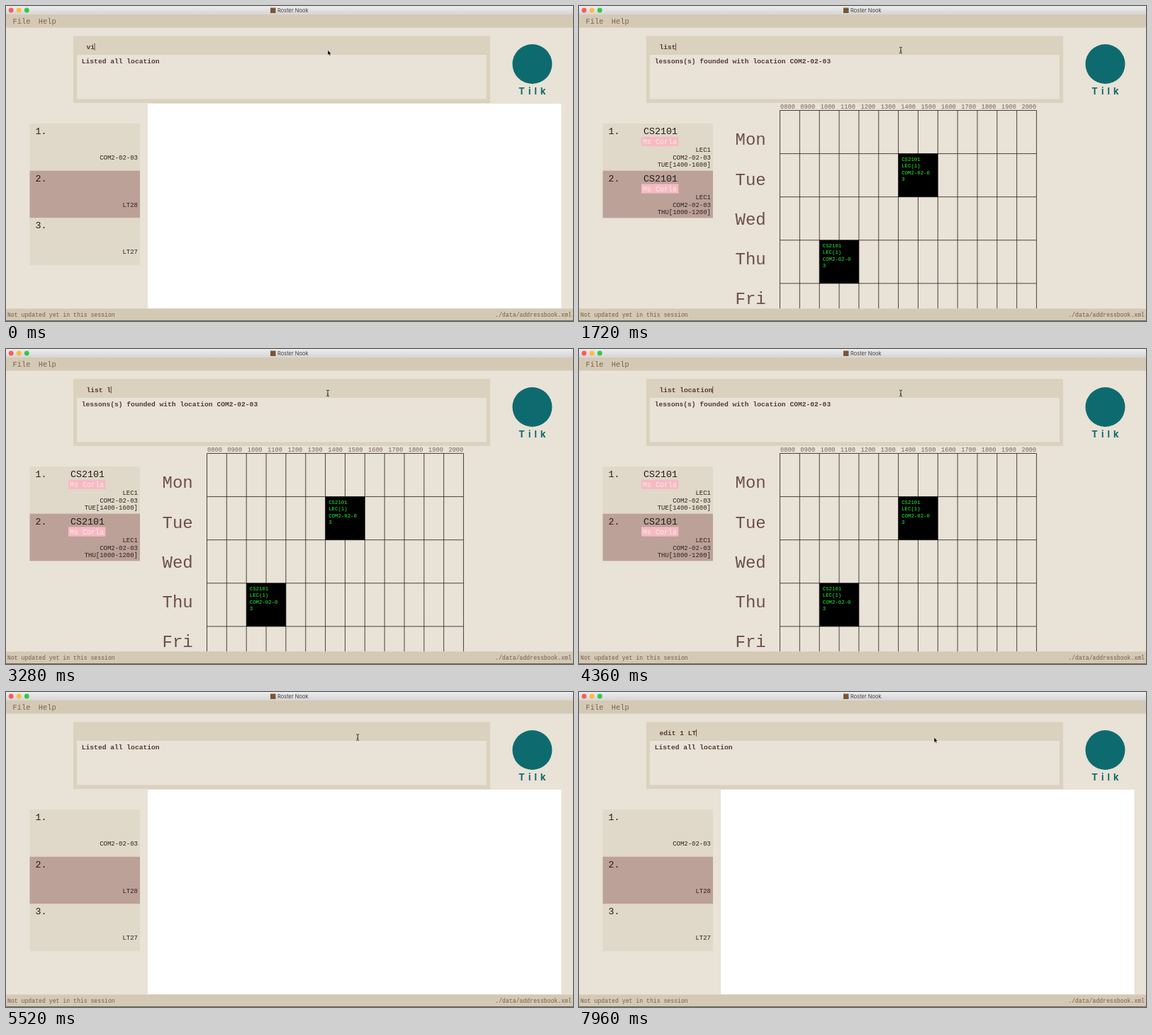
Recreate the animation shown at these times as an HTML page. Size 800 by 445 pixels, loop 8 s.

```html
<!DOCTYPE html>
<html lang="en">
<head>
<meta charset="utf-8">
<title>Roster Nook</title>
<style>
  html, body { margin: 0; width: 100%; height: 100%; overflow: hidden; background: #e9e2d6; }
  svg { display: block; width: 100vw; height: 100vh; }
  text { font-family: "Liberation Mono", monospace; white-space: pre; }
  .ui { font-family: Inter, sans-serif; }
  .menu { font-size: 10.4px; fill: #7b6453; }
  .command { font-size: 9.65px; font-weight: bold; fill: #553a34; }
  .status { font-size: 8.17px; fill: #715c4e; }
  .heading { font-size: 13.3px; fill: #241d1a; }
  .detail { font-size: 8.97px; fill: #2b2320; text-anchor: end; }
  .tag { font-size: 10px; fill: #f6ede4; }
  .hour { font-size: 8.7px; fill: #78615a; }
  .day { font-size: 24px; fill: #6c504a; }
  .slot { font-size: 7.35px; fill: #2cf53c; }
</style>
</head>
<body>
<svg id="stage" viewBox="0 0 800 445" preserveAspectRatio="none">
  <defs>
    <linearGradient id="bar" x2="0" y2="1">
      <stop stop-color="#ededed"/><stop offset="1" stop-color="#d6d5d6"/>
    </linearGradient>
  </defs>
  <rect width="800" height="445" fill="#e9e2d6"/>
  <rect width="800" height="12" fill="url(#bar)"/>
  <circle cx="7.2" cy="6" r="3.4" fill="#fc5b57"/>
  <circle cx="18.2" cy="6" r="3.4" fill="#fdbc3f"/>
  <circle cx="29.3" cy="6" r="3.4" fill="#34c84a"/>
  <rect x="373" y="2.5" width="7.5" height="7.5" fill="#7a5636"/>
  <text class="ui" x="383" y="9" font-size="7.5" fill="#404040">Roster Nook</text>

  <rect y="12" width="800" height="18.5" fill="#d4c9b4"/>
  <text class="menu" x="9.5" y="25">File</text>
  <text class="menu" x="45.7" y="25">Help</text>

  <rect x="95" y="42.5" width="588" height="94.5" fill="#dad1be"/>
  <rect x="100" y="69" width="578" height="62.5" fill="#e9e2d6"/>
  <text class="command" id="command" x="113.4" y="61.3"></text>
  <rect id="caret" y="52.7" width="0.9" height="10" fill="#553a34"/>
  <text class="command" id="message" x="106.8" y="81"></text>

  <circle cx="742.5" cy="82" r="28" fill="#0d6b6f"/>
  <text class="ui" x="745" y="125" font-size="13" font-weight="bold" letter-spacing="5"
        text-anchor="middle" fill="#0d6b6f">Tilk</text>

  <g id="locations"><rect x="200" y="138" width="583.5" height="289" fill="#fff"/></g>
  <g id="lessons"></g>

  <rect y="427.5" width="800" height="17.5" fill="#d4c9b4"/>
  <rect y="444.2" width="800" height="0.8" fill="#55504a"/>
  <text class="status" x="2" y="439">Not updated yet in this session</text>
  <text class="status" x="798" y="439" text-anchor="end">./data/addressbook.xml</text>

  <g id="pointer">
    <path id="arrow" d="M0 0V7.4L1.7 5.9L2.9 8.6L4 8.1L2.9 5.5H5.1Z" fill="#000" stroke="#fff" stroke-width="0.5"/>
    <path id="beam" d="M-2 -4Q0 -4 0 -3Q0 -4 2 -4M0 -3V3.5M-2 4.5Q0 4.5 0 3.5Q0 4.5 2 4.5M-1 1.5H1"
          fill="none" stroke="#222" stroke-width="0.9"/>
  </g>
</svg>
<script>
const LOOP = 8000, CHAR = 5.79;
const VIEWED = 840, LISTED = 4680, MESSAGE_DELAY = 80;
const $ = id => document.getElementById(id);

function add(parent, name, attributes, content = '') {
  const node = document.createElementNS('http://www.w3.org/2000/svg', name);
  for (const key in attributes) node.setAttribute(key, attributes[key]);
  node.textContent = content;
  parent.append(node);
}
const rect = (parent, x, y, width, height, fill) => add(parent, 'rect', { x, y, width, height, fill });
const label = (parent, kind, x, y, content) => add(parent, 'text', { class: kind, x, y }, content);

function card(parent, index, details, lesson) {
  const y = 166 + index * 66.7;
  rect(parent, 33.5, y, 155.5, 66.7, index === 1 ? '#bca199' : '#e0d8c8');
  label(parent, 'heading', 41.5, y + 15, `${index + 1}.`);
  if (lesson) {
    label(parent, 'heading', 91, y + 15, lesson);
    rect(parent, 88, y + 18.7, 52.5, 13.3, '#f7b9c3');
    label(parent, 'tag', 90, y + 28.8, 'Ms Corla');
  }
  details.forEach((line, i) =>
    label(parent, 'detail', 186, y + (lesson ? 40.3 : 50.8) + i * 10.5, line));
}

function buildTimetable(parent) {
  const left = 283.5, top = 147.5, column = 27.85, row = 61.1;
  let lines = '';
  for (let i = 0; i <= 13; i++) lines += `M${left + i * column} ${top}V427.5`;
  for (let i = 0; i < 5; i++) lines += `M${left} ${top + i * row}H${left + 13 * column}`;
  add(parent, 'path', { d: lines, stroke: '#35312e', 'stroke-width': 0.9 });
  for (let i = 0; i < 13; i++)
    label(parent, 'hour', 284 + i * 28.37, 145, String(800 + i * 100).padStart(4, '0'));
  ['Mon', 'Tue', 'Wed', 'Thu', 'Fri'].forEach((day, i) =>
    label(parent, 'day', 220.5, 196.3 + i * 56.2, day));
  for (const [hour, day] of [[6, 1], [2, 3]]) {
    const x = left + hour * column, y = top + day * row;
    rect(parent, x, y, column * 2, row, '#000');
    ['CS2101', 'LEC(1)', 'COM2-02-0', '3'].forEach((line, i) =>
      label(parent, 'slot', x + 4.6, y + 9.9 + i * 9.5, line));
  }
}

[['COM2-02-03'], ['LT28'], ['LT27']].forEach((place, i) => card($('locations'), i, place));
['TUE[1400-1600]', 'THU[1000-1200]'].forEach((slot, i) =>
  card($('lessons'), i, ['LEC1', 'COM2-02-03', slot], 'CS2101'));
buildTimetable($('lessons'));

// Typing bursts: start time, time per key, text already there, new keys.
const bursts = [
  [0, 130, 'v', 'iew'], [460, 180, 'view', ' 1'], [VIEWED, 0, '', ''],
  [1320, 120, '', 'list'], [3000, 240, 'list', ' l'], [3400, 120, 'list l', 'ocation'],
  [LISTED, 0, '', ''], [6300, 150, '', 'edit'], [6960, 240, 'edit', ' 1'],
  [7520, 200, 'edit 1', ' LT']
];

function typed(t) {
  const [start, step, before, keys] = bursts.findLast(burst => burst[0] <= t);
  const count = keys && Math.min(keys.length, 1 + Math.floor((t - start) / step));
  return { text: before + keys.slice(0, count), since: t - start - Math.max(0, count - 1) * step };
}

function draw(t) {
  const showLessons = t >= VIEWED && t < LISTED;
  $('lessons').style.display = showLessons ? '' : 'none';
  $('locations').style.display = showLessons ? 'none' : '';

  const { text, since } = typed(t);
  $('command').textContent = text;
  $('caret').setAttribute('x', 113 + text.length * CHAR);
  $('caret').style.display = since % 1000 < 500 ? '' : 'none';
  $('message').textContent = t >= VIEWED + MESSAGE_DELAY && t < LISTED + MESSAGE_DELAY
    ? 'lessons(s) founded with location COM2-02-03' : 'Listed all location';

  const p = Math.min(1, Math.max(0, (t - 5200) / 400)), ease = p * p * (3 - 2 * p);
  const beam = t >= 400 && t < 5600;
  $('pointer').setAttribute('transform', `translate(${454 + 47 * ease} ${62.2 + 1.8 * ease})`);
  $('beam').style.display = beam ? '' : 'none';
  $('arrow').style.display = beam ? 'none' : '';
}

const begin = performance.now();
function tick() {
  draw((performance.now() - begin) % LOOP);
  requestAnimationFrame(tick);
}
tick();
</script>
</body>
</html>
```
